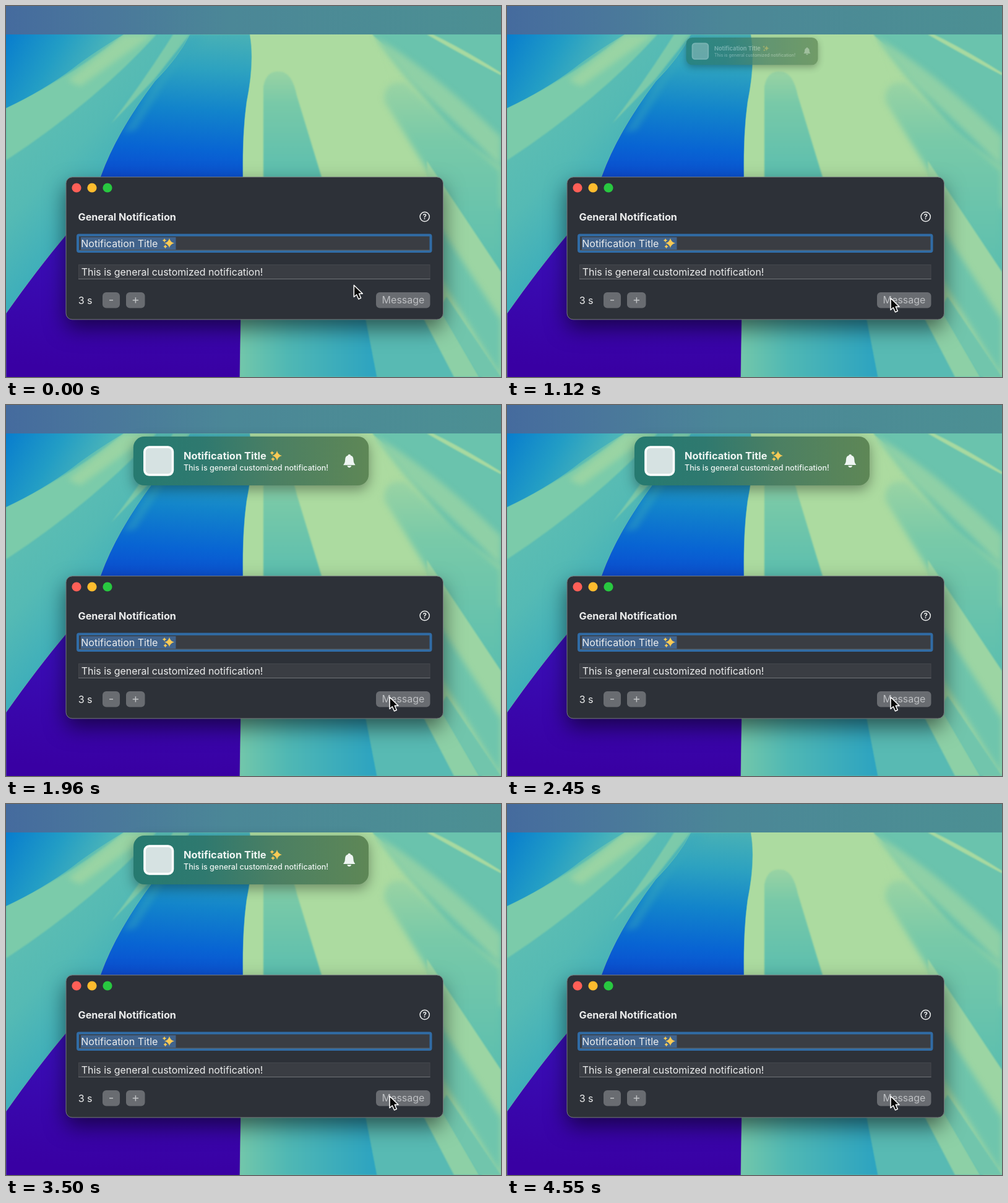
An HTML page that plays this animation: 800 px wide and 600 px high, repeating every 4.69 s.

```html
<!DOCTYPE html>
<html lang="en">
<head>
<meta charset="utf-8">
<title>General Notification</title>
<style>
  html, body { margin: 0; width: 100%; height: 100%; overflow: hidden; background: #62c1b0; }
  svg { display: block; width: 800px; height: 600px; font-family: Inter, "Liberation Sans", sans-serif; }
  .soft { filter: blur(5px); }
  .edge { filter: blur(1px); }
  .window { filter: drop-shadow(0 14px 17px rgba(0, 0, 0, .55)); }
  .card { filter: drop-shadow(0 7px 10px rgba(0, 0, 0, .36)); }
  .bold { font-weight: 700; }
</style>
</head>
<body>
<svg viewBox="0 0 800 600">
  <defs>
    <linearGradient id="base" x2="1" y2=".25">
      <stop stop-color="#42b2ba"/><stop offset=".3" stop-color="#68c3b0"/>
      <stop offset=".75" stop-color="#70c7aa"/><stop offset="1" stop-color="#5abdb0"/>
    </linearGradient>
    <linearGradient id="corner" y2=".35">
      <stop stop-color="#087dce"/><stop offset=".45" stop-color="#229dc5"/><stop offset="1" stop-color="#5dbeb3"/>
    </linearGradient>
    <linearGradient id="leftTeal" x2=".7" y2="1">
      <stop stop-color="#69c3b0"/><stop offset=".45" stop-color="#55bab4"/><stop offset="1" stop-color="#199cc5"/>
    </linearGradient>
    <linearGradient id="beam" gradientUnits="userSpaceOnUse" x1="330" y1="46" x2="290" y2="600">
      <stop stop-color="#47b0b6"/><stop offset=".1" stop-color="#2da2c0"/><stop offset=".22" stop-color="#1284cb"/>
      <stop offset=".34" stop-color="#0864d3"/><stop offset=".42" stop-color="#0b4fd0"/>
      <stop offset=".6" stop-color="#3910b8"/><stop offset="1" stop-color="#3900a3"/>
    </linearGradient>
    <linearGradient id="finger" x2="0" y2="1">
      <stop stop-color="#99d3a3"/><stop offset=".3" stop-color="#78c9a8"/><stop offset="1" stop-color="#5bbeaf"/>
    </linearGradient>
    <linearGradient id="floor">
      <stop stop-color="#73c7aa"/><stop offset=".35" stop-color="#50b8b4"/><stop offset="1" stop-color="#2ca3c1"/>
    </linearGradient>
    <linearGradient id="bar">
      <stop stop-color="#456b9e"/><stop offset=".2" stop-color="#4a779b"/>
      <stop offset=".45" stop-color="#4b8797"/><stop offset="1" stop-color="#4c9093"/>
    </linearGradient>
    <linearGradient id="glass">
      <stop stop-color="#267a70"/><stop offset=".3" stop-color="#2f796f"/>
      <stop offset=".6" stop-color="#4b7f63"/><stop offset="1" stop-color="#5e8756"/>
    </linearGradient>
    <path id="star" d="M0-8Q1.4-1.4 8 0Q1.4 1.4 0 8Q-1.4 1.4-8 0Q-1.4-1.4 0-8"/>
    <g id="sparkles" fill="#f8ca55">
      <use href="#star" x="2"/>
      <use href="#star" transform="translate(-6 -4.5) scale(.42)"/>
      <use href="#star" transform="translate(-4.5 5.5) scale(.42)"/>
    </g>
  </defs>

  <!-- wallpaper -->
  <rect width="800" height="600" fill="url(#base)"/>
  <path fill="url(#leftTeal)" d="M0 250Q130 160 240 46H300L153 275 97 370 0 497Z"/>
  <path class="edge" fill="#7bcbaa" d="M0 165Q120 105 190 46H243Q150 150 0 250Z"/>
  <path class="soft" fill="#a6d8a1" opacity=".7" d="M190 46H238L120 130 100 120Z"/>
  <path fill="url(#corner)" d="M0 46H190Q140 76 108 101Q60 137 0 165Z"/>
  <path class="edge" fill="#8ad0a7" opacity=".75" d="M270 46H297L240 118 170 190Q225 118 270 46Z"/>

  <path class="soft" fill="#acdba0" d="M388 40H592Q625 85 650 115L720 205 800 260V330L690 275H380Z"/>
  <path class="edge" fill="#acdba0" d="M388 44H592L630 150 690 278H380Z"/>
  <path class="edge" fill="url(#finger)" d="M416 280V130Q421 104 442 106Q462 106 470 145L511 280Z"/>
  <path class="edge" fill="#6ac3ad" d="M592 46H800V254Q690 130 592 46Z"/>
  <path class="soft" fill="#8fd0a6" d="M594 48Q690 105 800 212V264Q730 190 655 125Z"/>
  <path class="soft" fill="url(#finger)" d="M612 155Q608 120 645 124Q710 185 800 266V440L690 280Z"/>
  <path class="edge" fill="#a8d9a0" d="M680 46H690Q740 70 800 108V112Q735 78 680 46Z"/>

  <path class="edge" fill="#9cd5a3" d="M680 250Q740 340 800 430V600H770L690 450Z"/>
  <path class="soft" fill="#6fc5ac" d="M690 340L800 508V600L690 420Z"/>
  <path class="edge" fill="url(#floor)" d="M376 490H580L600 600H376Z"/>
  <path class="edge" fill="#58bab3" d="M580 500H690L742 600H600Z"/>
  <path class="edge" fill="#8dd0a6" d="M672 500H708L765 600H724Z"/>
  <path class="edge" fill="#71c5ac" d="M700 490L712 470 800 600H765Z"/>

  <path fill="url(#beam)" stroke="#84cda6" stroke-opacity=".6"
    d="M297 46Q278 84 240 122Q178 205 153 275L97 370Q50 426 0 497V602H378L383 275Q382 205 389 155Q402 90 394 46Z"/>
  <path class="soft" fill="#38a8bd" opacity=".42" d="M298 50L242 125 190 205 210 200 262 115 320 50Z"/>
  <rect width="800" height="46" fill="url(#bar)"/>

  <!-- notification card, laid out at full size -->
  <g id="card">
    <rect class="card" x="206" y="51" width="380" height="79" rx="17.5" fill="url(#glass)"/>
    <g id="content" fill="#eef5f2">
      <rect x="224" y="68" width="45.5" height="45" rx="7.5" fill="#d6e2e2" stroke="#fff" stroke-width="3.6"/>
      <text class="bold" x="287" y="88" font-size="16.4">Notification Title</text>
      <use href="#sparkles" x="436" y="82"/>
      <text x="287" y="106" font-size="12.5" font-weight="500">This is general customized notification!</text>
      <path transform="translate(554.7 90.5)"
        d="M-9.5 6.6Q-9.5 5.5-8 4Q-6.8 2.5-6.7-2Q-6.5-8-2.4-8.8Q-2-10.8 0-10.8T2.4-8.8Q6.5-8 6.7-2Q6.8 2.5 8 4Q9.5 5.5 9.5 6.6ZM-3.4 7.8H3.4Q2.8 10.6 0 10.6T-3.4 7.8Z"/>
    </g>
  </g>

  <!-- settings window -->
  <g fill="#eceded" font-size="16">
    <rect class="window" x="97" y="277" width="609.5" height="230" rx="10" fill="#2d3138"/>
    <rect x="97" y="276.7" width="609.5" height="230.3" rx="10" fill="none" stroke="#777a7d"/>
    <circle cx="114" cy="294" r="7.6" fill="#ff5f57"/>
    <circle cx="139" cy="294" r="7.6" fill="#febc2e"/>
    <circle cx="164" cy="294" r="7.6" fill="#28c840"/>
    <text class="bold" x="116.5" y="347" font-size="16.2">General Notification</text>
    <circle cx="676.7" cy="340.8" r="7.6" fill="none" stroke="#eceded" stroke-width="1.5"/>
    <text class="bold" x="676.7" y="345" font-size="11.5" text-anchor="middle">?</text>

    <rect x="116" y="370.5" width="570.5" height="26.5" rx="2" fill="#3a3d43" stroke="#306ca6" stroke-width="4"/>
    <path d="M119 395H685" stroke="#606469"/>
    <rect x="121" y="374" width="153.5" height="20" fill="#41638c"/>
    <text x="121.3" y="389.5">Notification Title</text>
    <use href="#sparkles" x="262" y="383.5"/>

    <rect x="117.5" y="418.5" width="567.5" height="23" fill="#3a3d43" stroke="#44474c"/>
    <path d="M117 441.5H685.5" stroke="#707378"/>
    <text x="121.8" y="435.5" font-size="15.9">This is general customized notification!</text>

    <text x="116.7" y="481.7">3 s</text>
    <g fill="#696c71">
      <rect x="156" y="463" width="28" height="25.5" rx="6"/>
      <rect x="194" y="463" width="30.5" height="25.5" rx="6"/>
      <rect id="button" x="598" y="463" width="87.5" height="25.5" rx="6"/>
    </g>
    <path d="M167 475.8H173M204.8 475.8H214M209.4 471.2V480.4" stroke="#c2c4c6" stroke-width="1.5"/>
    <text x="642" y="481" fill="#bdbfc2" text-anchor="middle">Message</text>
  </g>

  <circle id="ring" cx="620.5" cy="475.5" r="28.5" fill="none" stroke="#26569c" stroke-width="3.6"/>
  <path id="cursor" d="M0 0V19L4.3 15.2 7.5 22.5 11.3 20.8 8.2 13.8H14Z"
    fill="#080808" stroke="#fff" stroke-width="1.5" stroke-linejoin="round"/>
</svg>
<script>
const LOOP = 4690, STEP = 70, SHOW = 1002, HIDE = 3987;
const $ = id => document.getElementById(id);
const clamp = v => Math.max(0, Math.min(1, v));
const set = (id, name, value) => $(id).setAttribute(name, value);

// Underdamped spring from 0 to 1: response 0.5 s, damping 0.6
function spring(ms) {
  if (ms <= 0) return 0;
  const s = ms / 1000, w = 4 * Math.PI, a = .8 * w * s;
  return 1 - Math.exp(-.6 * w * s) * (Math.cos(a) + .75 * Math.sin(a));
}

function draw(t) {
  const p = clamp(t / 490), move = p * p * (3 - 2 * p);
  set("cursor", "transform", `translate(${562.3 + 57.7 * move} ${451.5 + 21 * move})`);

  const pressed = t >= 630 && t < 910;
  set("ring", "opacity", pressed ? 1 : 0);
  set("button", "fill", pressed ? "#87898c" : "#696c71");

  const gone = t > HIDE + 219;
  const scale = gone ? 0 : t < HIDE ? spring(t - SHOW) : 1 - spring(t - HIDE);
  set("card", "visibility", scale > .01 ? "visible" : "hidden");
  set("card", "transform", `translate(396 51) scale(${Math.max(scale, .01)}) translate(-396 -51)`);
  set("card", "opacity", clamp(scale * 1.35));
  set("content", "opacity", clamp((scale - .2) / .8));
}

function tick() {
  const t = performance.now() % LOOP;
  draw(Math.floor(t / STEP) * STEP);
  requestAnimationFrame(tick);
}
tick();
</script>
</body>
</html>
```
